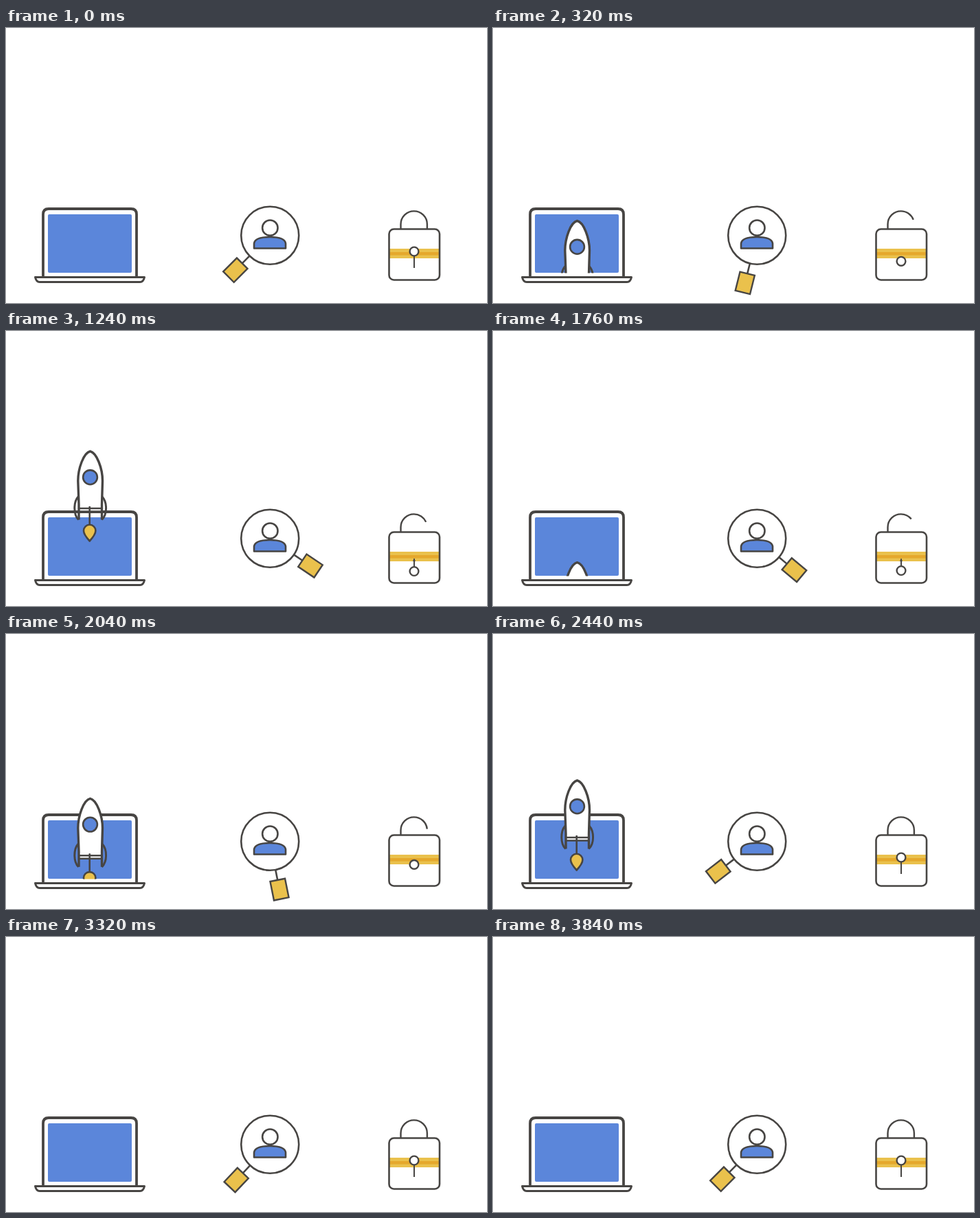
An HTML page for the animation above (3880 ms loop, 700 px wide and 400 px high).

```html
<!DOCTYPE html>
<html lang="en">
<head>
<meta charset="utf-8">
<title>Laptop, search and lock icons</title>
<style>
  html, body { margin: 0; width: 100%; height: 100%; overflow: hidden; background: #fff; }
  svg { display: block; width: 700px; height: 400px; }
  .ink { stroke: #474543; fill: none; stroke-width: 2.6; stroke-linejoin: round; }
  .bold { stroke-width: 3.4; }
  .white { fill: #fff; }
  .blue { fill: #5b86da; }
  .gold { fill: #eac14c; }
  .amber { fill: #e5a82c; }
  .dark { fill: #474543; }
</style>
</head>
<body>
<svg viewBox="0 0 700 400">
  <defs>
    <clipPath id="above"><rect width="700" height="356.5"/></clipPath>
  </defs>

  <g id="laptop">
    <path class="ink white" stroke-width="4" style="stroke-width:3.8" d="M54 362V271Q54 263 62 263H182Q190 263 190 271V362"/>
    <rect class="blue" x="61" y="271" width="122" height="85" rx="2"/>
    <path class="ink white" style="stroke-width:3" d="M42.5 362.5H201.5Q200 369.5 195 369.5H49Q44 369.5 42.5 362.5Z"/>
  </g>

  <g clip-path="url(#above)">
    <g id="rocket">
      <path class="ink bold" style="stroke-width:3" d="M105 279C98 287 98 305 105.5 312.5M140 279C147.500 287 147.500 305 139.500 312.500"/>
      <path class="white" d="M122.500 213C113 215 104.800 238 104.800 256L106 300H139.500L140.500 256C140.500 238 132 215 122.500 213Z"/>
      <path class="ink bold" d="M106 312.500V290L104.800 256C104.800 238 113 215 122.500 213C132 215 140.500 238 140.500 256L139.500 290V312.500"/>
      <path class="ink" d="M106 296H139.500M106 300.500H139.500M121.700 293V320"/>
      <circle class="ink blue" cx="122.500" cy="250.800" r="10.400"/>
      <path class="ink gold" d="M121.700 343.500Q113 334 113 328.500A8.700 8.700 0 0 1 130.400 328.500Q130.400 334 121.700 343.500Z"/>
    </g>
  </g>

  <g id="search">
    <g id="handle">
      <path class="ink" d="M426 302H441"/>
      <rect class="ink gold" style="stroke-linejoin:miter;stroke-width:2.400" x="441" y="291" width="28" height="22"/>
    </g>
    <circle class="ink white" cx="384.200" cy="301.800" r="42"/>
    <path class="ink blue" d="M361 320.500V313.500Q362 304 384 304Q406 304 407 313.500V320.500Z"/>
    <circle class="ink white" cx="384.300" cy="290.700" r="11.200"/>
  </g>

  <g id="lock">
    <path id="shackle" class="ink" style="stroke-width:2.400" pathLength="100" d="M574.500 292V285.500A19.200 19.200 0 0 1 612.900 285.500V292"/>
    <rect class="white" x="557.500" y="292.500" width="73.500" height="74" rx="7"/>
    <rect class="gold" x="558" y="321" width="72.500" height="14"/>
    <rect class="amber" x="558" y="326" width="72.500" height="4.500"/>
    <rect class="ink" x="557.500" y="292.500" width="73.500" height="74" rx="7"/>
    <path id="stem" class="ink" style="stroke-width:2"/>
    <path id="tip" class="dark" d="M594 330.500L596 335H592Z"/>
    <circle id="hole" class="ink white" cx="594" r="6.400" style="stroke-width:2.400"/>
  </g>
</svg>

<script>
  const LOOP = 3880, STEP = 40;
  const $ = id => document.getElementById(id);

  // Rows of [ms, value], eased between neighbours.
  const swing = [[0, 135], [920, 24], [1320, 35], [1640, 35], [2600, 151], [3080, 133], [3840, 135]];
  const shackle = [[0, 100], [600, 67], [1240, 80], [1760, 73.5], [2280, 100]];
  const hole = [[0, 325], [600, 351], [1240, 349.5], [1760, 348.5], [2280, 325]];
  const stem = [[0, 349], [600, 331], [1760, 331.5], [2280, 349]];

  const ease = x => x * x * (3 - 2 * x);

  function at(rows, t) {
    const i = rows.findIndex(row => row[0] > t);
    if (i < 0) return rows[rows.length - 1][1];
    const [t0, a] = rows[i - 1], [t1, b] = rows[i];
    return a + (b - a) * ease((t - t0) / (t1 - t0));
  }

  // Rise from the screen, wait, then shoot off the top; two flights per loop.
  function rocketY(t) {
    if (t >= 3200) return 150;
    const u = t % 1600;
    if (u < 600) return 150 * (1 - ease(u / 600));
    if (u < 1200) return 0;
    return -38 * ((u - 1200) / STEP) ** 1.25;
  }

  function draw(t) {
    $('rocket').setAttribute('transform', `translate(0 ${rocketY(t)})`);
    $('handle').setAttribute('transform', `rotate(${at(swing, t)} 384 302)`);
    $('shackle').setAttribute('stroke-dasharray', `${at(shackle, t)} 200`);
    const y = at(hole, t), end = at(stem, t);
    $('hole').setAttribute('cy', y);
    $('stem').setAttribute('d', `M594 ${y}V${end}`);
    $('tip').setAttribute('visibility', end < 333 ? 'visible' : 'hidden');
  }

  const start = performance.now();
  function tick() {
    const t = (performance.now() - start) % LOOP;
    draw(Math.floor(t / STEP) * STEP);
    requestAnimationFrame(tick);
  }
  draw(0);
  requestAnimationFrame(tick);
</script>
</body>
</html>
```
